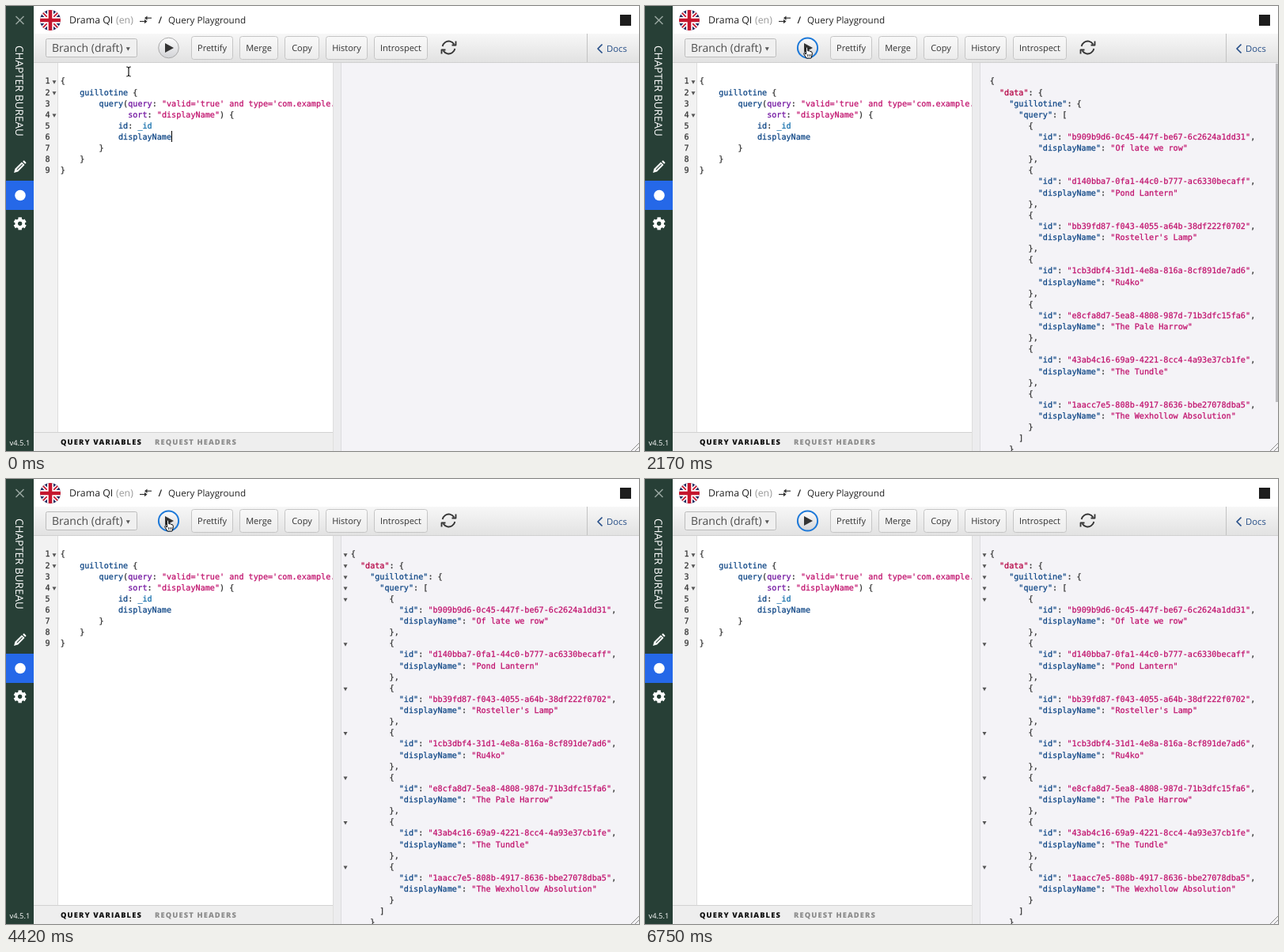
Animation, 800 px wide and 563 px high, one loop 6.83 s. Source, as an HTML page with a canvas:

```html
<!DOCTYPE html>
<html lang="en">
<head>
<meta charset="utf-8">
<title>Query Playground</title>
<style>
html, body { margin: 0; width: 100%; height: 100%; overflow: hidden; background: #fff; }
canvas { display: block; }
</style>
</head>
<body>
<canvas id="stage" width="800" height="563"></canvas>
<script>
const ctx = document.getElementById('stage').getContext('2d');
const LOOP = 6830, STEP = LOOP / 82;
const SANS = '"Open Sans", sans-serif', MONO = '"DejaVu Sans Mono", monospace';
const CODE_SIZE = 10.13, COL = 6.1, ROW = 14.12, CODE_TOP = 98.4;
const INK = '#303030', BLUE = '#0d4585', TEAL = '#1670ac', PURPLE = '#70129f', PINK = '#c0106c', CRIMSON = '#b50043';
const SIDEBAR = '#273f36';

const TIMES = {
  moveStart: 200, moveEnd: 800, tipOn: 920, click: 1600,
  result: 1990, folds: 2570, scrollbarOff: 2570, pointerOff: 6400
};

const QUERY = [
  [[INK, '{']],
  [[BLUE, '    guillotine'], [INK, ' {']],
  [[BLUE, '        query'], [INK, '('], [PURPLE, 'query'], [INK, ': '], [PINK, '"valid=\'true\' and type=\'com.example.']],
  [[PURPLE, '              sort'], [INK, ': '], [PINK, '"displayName"'], [INK, ') {']],
  [[BLUE, '            id'], [INK, ': '], [TEAL, '_id']],
  [[BLUE, '            displayName']],
  [[INK, '        }']],
  [[INK, '    }']],
  [[INK, '}']]
];

const FILMS = [
  ['b909b9d6-0c45-447f-be67-6c2624a1dd31', 'Of late we row'],
  ['d140bba7-0fa1-44c0-b777-ac6330becaff', 'Pond Lantern'],
  ['bb39fd87-f043-4055-a64b-38df222f0702', "Rosteller's Lamp"],
  ['1cb3dbf4-31d1-4e8a-816a-8cf891de7ad6', 'Ru4ko'],
  ['e8cfa8d7-5ea8-4808-987d-71b3dfc15fa6', 'The Pale Harrow'],
  ['43ab4c16-69a9-4221-8cc4-4a93e37cb1fe', 'The Tundle'],
  ['1aacc7e5-808b-4917-8636-bbe27078dba5', 'The Wexhollow Absolution']
];

const field = (indent, key, color = BLUE) => [color, ' '.repeat(indent) + `"${key}"`];
const RESULT = [
  [[INK, '{']],
  [field(2, 'data', CRIMSON), [INK, ': {']],
  [field(4, 'guillotine'), [INK, ': {']],
  [field(6, 'query'), [INK, ': [']],
  ...FILMS.flatMap(([id, name], i) => [
    [[INK, '        {']],
    [field(10, 'id'), [INK, ': '], [PINK, `"${id}"`], [INK, ',']],
    [field(10, 'displayName'), [INK, ': '], [PINK, `"${name}"`]],
    [[INK, i < FILMS.length - 1 ? '        },' : '        }']]
  ]),
  [[INK, '      ]']],
  [[INK, '    }']]
];

function rect(x, y, w, h, fill) {
  ctx.fillStyle = fill;
  ctx.fillRect(x, y, w, h);
}

function text(str, x, y, size, color, { font = SANS, weight = 400, align = 'left', spacing = 0, thicken = 0 } = {}) {
  ctx.font = `${weight} ${size}px ${font}`;
  ctx.letterSpacing = spacing + 'px';
  ctx.textAlign = align;
  ctx.fillStyle = color;
  ctx.fillText(str, x, y);
  if (!thicken) return;
  ctx.strokeStyle = color;
  ctx.lineWidth = thicken;
  ctx.strokeText(str, x, y);
}

function tracePath(points) {
  ctx.beginPath();
  points.forEach(([x, y], i) => i ? ctx.lineTo(x, y) : ctx.moveTo(x, y));
}

function stroke(points, color, width) {
  tracePath(points);
  ctx.strokeStyle = color;
  ctx.lineWidth = width;
  ctx.stroke();
}

function polygon(points, fill) {
  tracePath(points);
  ctx.closePath();
  ctx.fillStyle = fill;
  ctx.fill();
}

function disc(x, y, r, fill) {
  ctx.beginPath();
  ctx.arc(x, y, r, 0, Math.PI * 2);
  ctx.fillStyle = fill;
  ctx.fill();
}

function ring(x, y, r, color, width, from = 0, to = Math.PI * 2) {
  ctx.beginPath();
  ctx.arc(x, y, r, from, to);
  ctx.strokeStyle = color;
  ctx.lineWidth = width;
  ctx.stroke();
}

function box(x, y, w, h, r, fill, border) {
  ctx.beginPath();
  ctx.roundRect(x + .5, y + .5, w - 1, h - 1, r);
  ctx.fillStyle = fill;
  ctx.fill();
  if (!border) return;
  ctx.strokeStyle = border;
  ctx.lineWidth = 1;
  ctx.stroke();
}

function vertical(y0, y1, top, bottom) {
  const g = ctx.createLinearGradient(0, y0, 0, y1);
  g.addColorStop(0, top);
  g.addColorStop(1, bottom);
  return g;
}

function at(x, y, draw) {
  ctx.save();
  ctx.translate(x, y);
  draw();
  ctx.restore();
}

const rowY = row => CODE_TOP + row * ROW;
const caretDown = (x, y, color) => polygon([[x - 2.5, y - 2], [x + 2.5, y - 2], [x, y + 2.5]], color);
const fold = (x, row) => caretDown(x, rowY(row) - 2.2, '#555');

function code(lines, x) {
  lines.forEach((tokens, row) => {
    let col = 0;
    for (const [color, str] of tokens) {
      text(str, x + col * COL, rowY(row), CODE_SIZE, color, { font: MONO, thicken: .25 });
      col += str.length;
    }
  });
}

function flag() {
  ctx.beginPath();
  ctx.arc(0, 0, 13, 0, Math.PI * 2);
  ctx.clip();
  rect(-13, -13, 26, 26, '#20285f');
  const bands = (points, white, red) => {
    for (const [width, color] of [[white, '#fff'], [red, '#c5162e']])
      for (const sign of [1, -1]) stroke(points(sign), color, width);
  };
  bands(s => [[-14, -14 * s], [14, 14 * s]], 5, 1.8);
  bands(s => s > 0 ? [[-14, 0], [14, 0]] : [[0, -14], [0, 14]], 8, 4.6);
}

function pencil() {
  ctx.rotate(Math.PI / 4);
  rect(-2.6, -6, 5.2, 12.2, '#fff');
  polygon([[-2.6, 6], [2.6, 6], [0, 10.5]], '#fff');
  box(-2.8, -10, 5.6, 3.2, 1, '#fff');
  stroke([[0, -4.5], [0, 5]], SIDEBAR, 1);
}

function gear() {
  for (let i = 0; i < 6; i++) {
    rect(-2.2, -8, 4.4, 5, '#fff');
    ctx.rotate(Math.PI / 3);
  }
  ring(0, 0, 4.5, '#fff', 3.6);
}

function sidebar() {
  rect(0, 0, 35, 563, SIDEBAR);
  stroke([[12.5, 13], [22.5, 23]], '#9aa8a2', 1.5);
  stroke([[22.5, 13], [12.5, 23]], '#9aa8a2', 1.5);
  at(12, 50, () => {
    ctx.rotate(Math.PI / 2);
    text('CHAPTER BUREAU', 0, 0, 13.5, '#fff');
  });
  at(17.5, 203.5, pencil);
  rect(0, 221, 35, 37, '#2568e8');
  disc(18, 239.5, 6.8, '#fff');
  at(17.7, 275.3, gear);
  text('v4.5.1', 4.5, 555.5, 9.4, '#fff');
}

function header() {
  rect(35, 0, 765, 35, '#fff');
  at(56, 18, flag);
  text('Drama QI', 80, 22.2, 12.35, '#222');
  text('(en)', 139, 22.2, 12.35, '#999');
  stroke([[169, 19.5], [177, 19.5]], '#333', 1.2);
  polygon([[175, 16.7], [175, 22.3], [178.5, 19.5]], '#333');
  stroke([[176, 15.2], [184, 15.2]], '#333', 1.2);
  polygon([[178.5, 12.4], [178.5, 18], [175, 15.2]], '#333');
  text('/', 192.5, 22, 12, '#222', { weight: 600 });
  text('Query Playground', 205, 22, 11.65, '#222');
  rect(776, 11, 14, 14, '#1d1d1d');
}

function refreshIcon() {
  for (let i = 0; i < 2; i++) {
    ring(0, 0, 8, '#333', 1.8, Math.PI * 1.06, Math.PI * 1.83);
    stroke([[9, -8], [9, -3], [4, -3]], '#333', 1.8);
    ctx.rotate(Math.PI);
  }
}

function toolbar(focused) {
  rect(35, 35, 765, 37, vertical(35, 71, '#f7f7f7', '#e2e2e2'));
  rect(35, 71, 765, 1, '#d0d0d0');
  box(50, 41, 116, 24, 2, '#f0f0f0', '#bcbcbc');
  text('Branch (draft)', 58, 58, 14, '#4d4d4d');
  caretDown(154.3, 54.3, '#555');

  disc(205.5, 53, 13, vertical(40, 66, '#fdfdfd', '#d2d3d6'));
  if (focused) ring(205.5, 53, 12.6, '#1c78d8', 2);
  else ring(205.5, 53, 12.8, '#a9a9a9', 1);
  polygon([[201, 47], [212, 53], [201, 59]], '#333');

  const buttons = [['Prettify', 234, 53], ['Merge', 295, 49], ['Copy', 352, 44], ['History', 404, 53], ['Introspect', 465, 68]];
  for (const [label, x, w] of buttons) {
    box(x, 38, w, 30, 3, vertical(38, 68, '#f9f9f9', '#ececec'), '#c5c5c5');
    text(label, x + w / 2, 56.5, 11, '#333', { align: 'center' });
  }
  at(559.5, 52.5, refreshIcon);

  rect(734, 35, 1, 36, '#c2c2c2');
  stroke([[753.5, 48.5], [748, 54], [753.5, 59.5]], '#274f88', 1.7);
  text('Docs', 759, 58, 11.3, '#274f88');
}

function editor(caretVisible) {
  rect(35, 72, 378, 491, '#fff');
  rect(35, 72, 30, 468, '#f2f2f2');
  rect(65, 72, 1, 468, '#dcdcdc');
  QUERY.forEach((_, row) => text(String(row + 1), 55.5, rowY(row), CODE_SIZE, '#333', { font: MONO, align: 'right', thicken: .25 }));
  [0, 1, 3].forEach(row => fold(61, row));
  ctx.save();
  ctx.beginPath();
  ctx.rect(66, 72, 347, 468);
  ctx.clip();
  code(QUERY, 68.8);
  ctx.restore();
  if (caretVisible) rect(209, 158, 1, 14, '#000');

  rect(35, 540, 378, 23, '#eeeeee');
  rect(35, 539, 378, 1, '#d2d2d2');
  text('QUERY VARIABLES', 69, 555.3, 9.4, '#111', { weight: 800, spacing: 1.1 });
  text('REQUEST HEADERS', 188, 555.3, 9.4, '#8c8c8c', { weight: 800, spacing: 1.1 });
}

function resultPane(hasResult, hasFolds, hasScrollbar) {
  rect(413, 72, 387, 491, '#f4f3f7');
  rect(413, 72, 10, 491, '#ececee');
  rect(413, 72, 1, 491, '#dedede');
  rect(423, 72, 1, 491, '#dcdcdf');
  if (hasResult) code(RESULT, 435.8);
  if (hasFolds) RESULT.forEach((tokens, row) => {
    if (/[{[]$/.test(tokens.at(-1)[1])) fold(429, row);
  });
  if (hasScrollbar) rect(797, 73, 3, 428, '#bcbcbf');
  stroke([[790, 563], [800, 553]], '#8d8d8d', 1);
  stroke([[795, 563], [800, 558]], '#8d8d8d', 1);
}

function tooltip() {
  box(193, 77, 116, 20, 1, '#262626');
  text('Execute Query (Ctrl-Enter)', 251, 90.2, 8.6, '#fff', { align: 'center' });
}

function outlined(points) {
  ctx.lineJoin = 'round';
  tracePath(points);
  ctx.closePath();
  ctx.fillStyle = '#fff';
  ctx.fill();
  ctx.strokeStyle = '#000';
  ctx.lineWidth = 1;
  ctx.stroke();
}

function beam() {
  stroke([[0, -5], [0, 5]], '#111', 1.2);
  for (const s of [-1, 1]) stroke([[-2.8, 6 * s], [-1, 5.7 * s], [0, 4.7 * s], [1, 5.7 * s], [2.8, 6 * s]], '#111', 1.1);
}

function arrow() {
  outlined([[0, -6], [0, 7], [3, 4.3], [5, 8.5], [7, 7.6], [5, 3.5], [9, 3.3]]);
}

function hand() {
  outlined([[-2.2, -5], [-1, -6], [.2, -5], [.4, -1], [2.2, -1.4], [3.4, -.4], [5, -.2], [5.8, 1.4],
    [5.6, 4.5], [4.4, 8], [-1.6, 8], [-4.8, 2.6], [-4.3, 1.4], [-2, 3]]);
  for (const x of [0, 1.9, 3.8]) stroke([[x, 3], [x, 6]], '#000', .7);
}

function pointer(t) {
  if (t >= TIMES.pointerOff) return;
  const p = Math.min(1, Math.max(0, (t - TIMES.moveStart) / (TIMES.moveEnd - TIMES.moveStart)));
  const ease = p * p * (3 - 2 * p);
  const x = 155 + 50.5 * ease, y = 83 - 25 * ease;
  const shape = y > 72 ? beam : Math.hypot(x - 205.5, y - 53) < 13 ? hand : arrow;
  at(x, y, shape);
}

function draw(now) {
  const t = Math.floor((now % LOOP) / STEP + .05) * STEP;
  const clicked = t >= TIMES.click, loaded = t >= TIMES.result;
  const caretVisible = !clicked && (t < 320 || (t >= 850 && t < 1380));
  ctx.textRendering = 'geometricPrecision';
  ctx.lineJoin = 'round';
  header();
  toolbar(clicked);
  editor(caretVisible);
  resultPane(loaded, t >= TIMES.folds, loaded && t < TIMES.scrollbarOff);
  sidebar();
  if (t >= TIMES.tipOn && !clicked) tooltip();
  pointer(t);
}

const start = performance.now();
function tick() {
  draw(performance.now() - start);
  requestAnimationFrame(tick);
}
tick();
</script>
</body>
</html>
```
